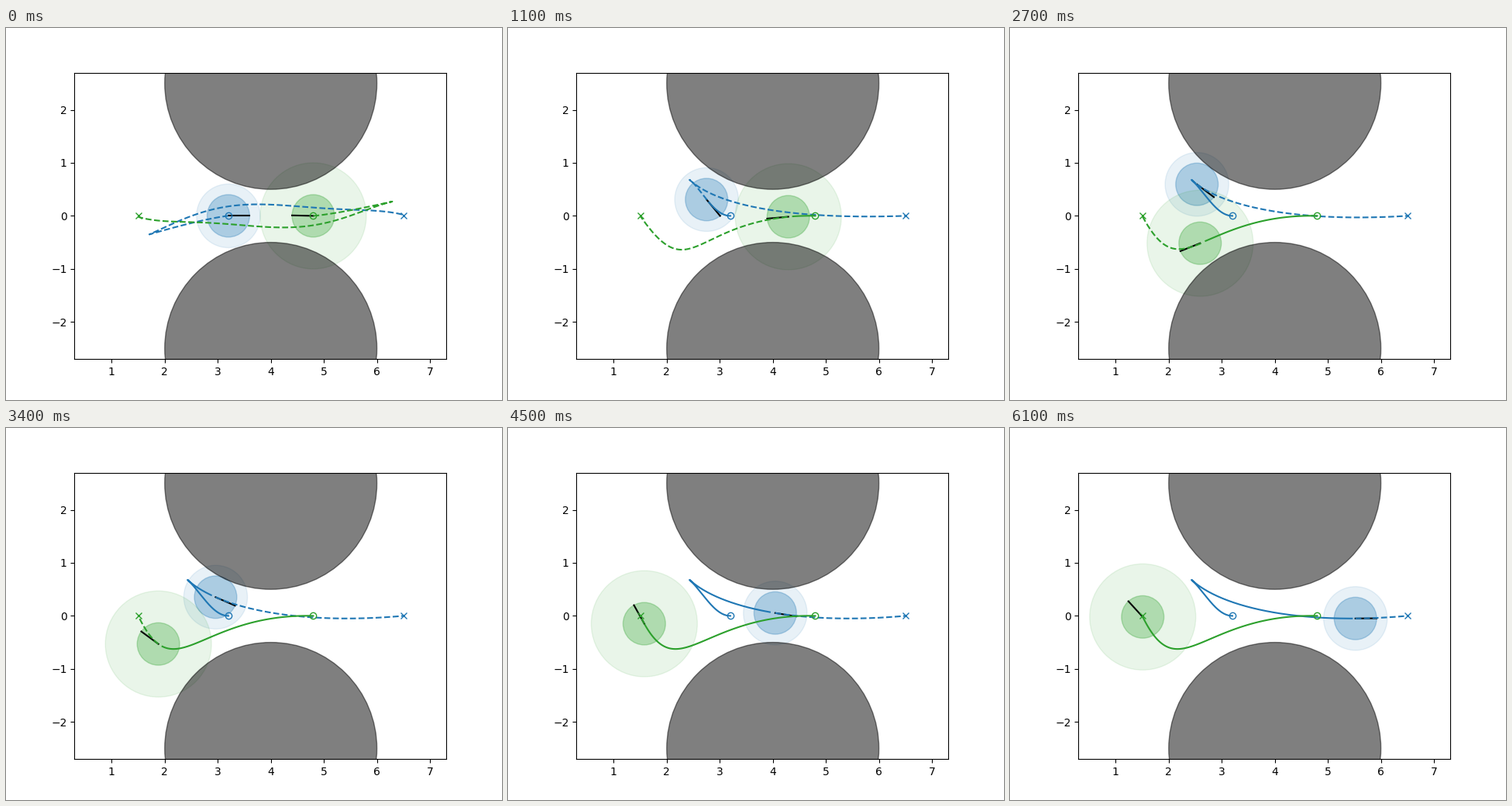
A matplotlib script for the animation above (6.2 s loop, 640x480 px).

```python
import matplotlib.pyplot as plt
import numpy as np
from matplotlib.animation import FuncAnimation
from matplotlib.patches import Circle

FRAMES, INTERVAL = 62, 100
BODY = 0.4


def cubic(points, t):
    """Bezier curve with four control points."""
    a, b, c, d = np.asarray(points, float)
    t = np.reshape(t, (-1, 1))
    return (1 - t)**3 * a + 3 * t * (1 - t)**2 * b + 3 * t**2 * (1 - t) * c + t**3 * d


def drive(length, start, accel, cruise, gain):
    """Distance per frame: speed up, cruise, then brake with the way left."""
    dist, speed, out = 0.0, 0.0, []
    for frame in range(FRAMES):
        out.append(dist)
        if frame >= start:
            last, speed = speed, min(speed + accel, cruise, gain * (length - dist))
            dist += (last + speed) / 2
    return np.array(out)


class Leg:
    """One stretch between stops; its planned shape turns from early into final."""

    def __init__(self, final, early, revise, start, accel, cruise, gain, gear=1):
        self.final, self.early = np.array(final), np.array(early)
        self.revise, self.start, self.gear = revise, start, gear
        t = np.linspace(0, 1, 400)
        steps = np.hypot(*np.diff(cubic(final, t), axis=0).T)
        dist = np.concatenate([[0], np.cumsum(steps)])
        travelled = drive(dist[-1], start, accel, cruise, gain)
        self.progress = np.interp(travelled, dist, t)

    def done(self, frame):
        return cubic(self.final, np.linspace(0, self.progress[frame], 100))

    def ahead(self, frame):
        w = np.interp(frame, self.revise, (0, 1))
        w = w * w * (3 - 2 * w)
        shape = (1 - w) * self.early + w * self.final
        return cubic(shape, np.linspace(self.progress[frame], 1, 150))

    def pose(self, frame):
        t = self.progress[frame]
        before, pos, after = cubic(self.final, [t - 1e-3, t, t + 1e-3])
        dx, dy = self.gear * (after - before)
        return pos, np.arctan2(dy, dx)


def first_guess(cusp_y):
    """Rough plan: back up to a cusp, then sweep forward to the goal."""
    v = np.linspace(0, 1, 60)
    back = np.column_stack([3.2 - 1.49 * v, cusp_y * v**1.25])
    xs = (1.71, 2.51, 3.2, 3.65, 4.5, 5.44, 6.5)
    ys = (cusp_y, 0, 0.18, 0.215, 0.18, 0.12, 0.02)
    x = np.linspace(xs[0], xs[-1], 200)
    return np.vstack([back, np.column_stack([x, np.polyval(np.polyfit(xs, ys, 5), x)])])


class Robot:
    def __init__(self, color, margin, legs, guess, spin=0):
        self.legs, self.guess, self.spin = legs, guess, spin
        self.discs = [ax.add_patch(Circle((0, 0), r, color=color, alpha=a))
                      for r, a in ((margin, 0.1), (BODY, 0.3))]
        self.nose, = ax.plot([], [], color="k")
        self.plan, = ax.plot([], [], "--", color=color)
        self.trail, = ax.plot([], [], color=color)
        ax.plot(*legs[0].final[0], "o", color=color, mfc="none")
        ax.plot(*legs[-1].final[-1], "x", color=color)

    def show(self, frame):
        begun = [leg for leg in self.legs if leg.start <= frame]
        pos, angle = begun[-1].pose(frame)
        angle += np.radians(self.spin) * np.clip((frame - 45) / 16, 0, 1)
        for disc in self.discs:
            disc.center = pos
        tip = pos + BODY * np.array([np.cos(angle), np.sin(angle)])
        self.nose.set_data(*zip(pos, tip))

        if frame == 0:
            self.trail.set_data([], [])
            self.plan.set_data(*self.guess.T)
            return
        # the trail ends one step behind the robot
        self.trail.set_data(*np.vstack([leg.done(frame - 1) for leg in begun]).T)
        to_go = self.legs[len(begun) - 1:]
        self.plan.set_data(*np.vstack([leg.ahead(frame) for leg in to_go]).T)


fig = plt.figure(figsize=(6.4, 4.8), dpi=100)
ax = fig.add_subplot()
ax.set_aspect("equal")
ax.set(xlim=(0.3, 7.3), ylim=(-2.7, 2.7), xticks=range(1, 8), yticks=range(-2, 3))

blue_legs = [
    Leg(final=[(3.2, 0), (2.9, 0), (2.69, 0.44), (2.43, 0.68)],
        early=[(3.2, 0), (2.9, 0), (2.69, 0.44), (2.47, 0.65)],
        revise=(11, 20), start=0, accel=0.0125, cruise=0.068, gain=0.35, gear=-1),
    Leg(final=[(2.43, 0.68), (3.0, 0.15), (4.5, -0.18), (6.5, 0)],
        early=[(2.43, 0.68), (3.0, 0.15), (4.5, -0.07), (6.5, 0)],
        revise=(20, 34), start=21, accel=0.0074, cruise=0.103, gain=0.06),
]
green_legs = [
    Leg(final=[(4.8, 0), (2.6, 0.05), (2.2, -1.43), (1.5, 0)],
        early=[(4.8, 0), (2.5, 0.03), (2.5, -1.45), (1.5, 0)],
        revise=(11, 34), start=0, accel=0.0084, cruise=0.113, gain=0.11),
]
mirrored = np.array([8, 0]) - first_guess(-0.27)
robots = [
    Robot("tab:blue", 0.6, blue_legs, first_guess(-0.35)),
    Robot("tab:green", 1.0, green_legs, mirrored, spin=16),
]
for y in (2.5, -2.5):
    ax.add_patch(Circle((4, y), 2, color="k", alpha=0.5))


def update(frame):
    for robot in robots:
        robot.show(frame)


anim = FuncAnimation(fig, update, frames=FRAMES, interval=INTERVAL,
                     init_func=lambda: update(0), repeat=True, repeat_delay=0)
plt.show()
```
